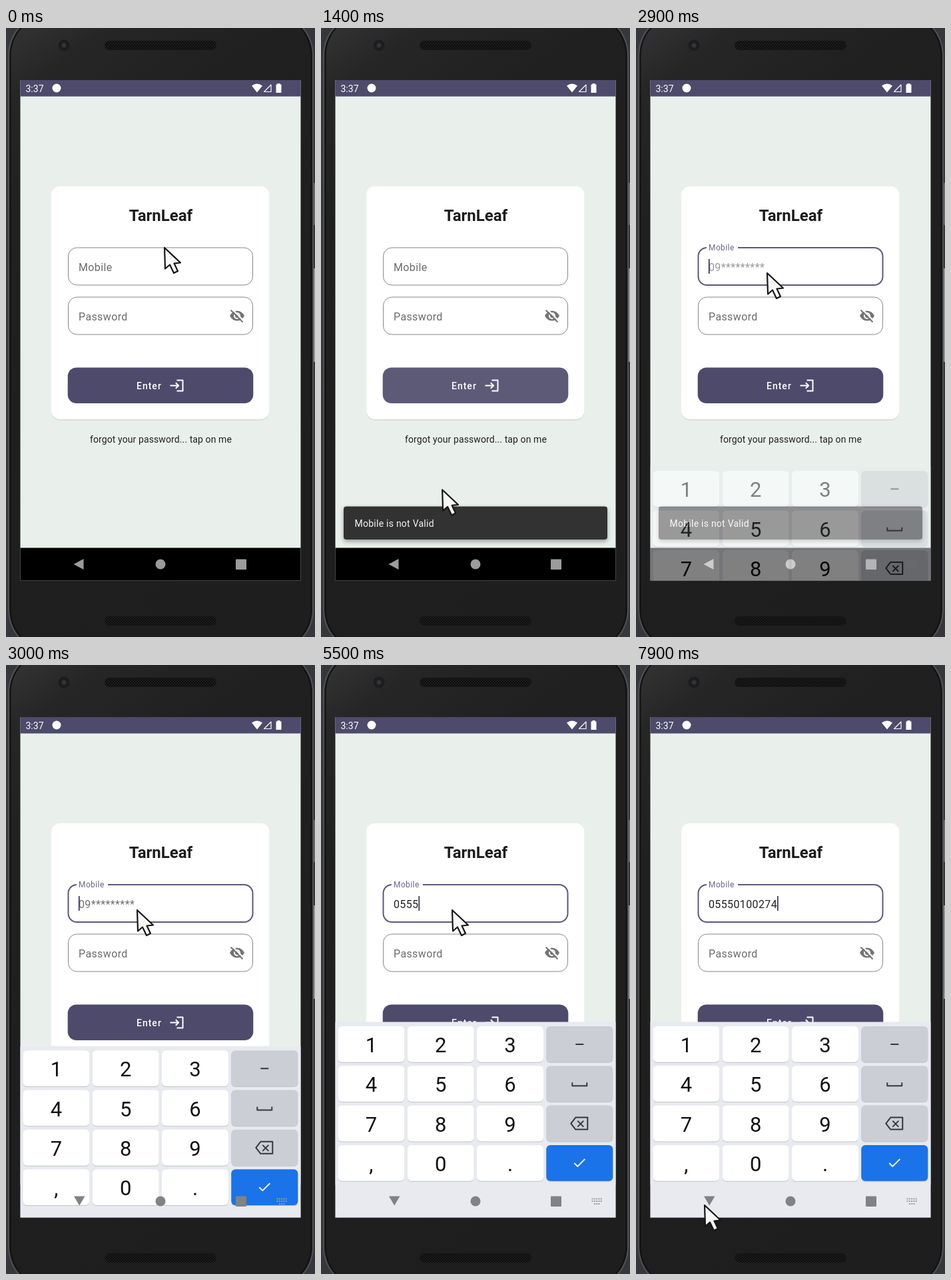
Animation, 464 px wide and 912 px high, one loop 8000 ms. Source, as an HTML page:

```html
<!DOCTYPE html>
<html lang="en">
<head>
<meta charset="utf-8">
<title>Login form</title>
<style>
  html, body { margin: 0; width: 100%; height: 100%; overflow: hidden; background: #36373b; }
  svg { display: block; width: 464px; height: 912px; }
  text { font-family: Roboto, sans-serif; white-space: pre; }
  .field { font-size: 16px; letter-spacing: .38px; }
  .small { font-size: 14px; }
  .digit { font-size: 31px; text-anchor: middle; fill: #111; }
  .line { fill: none; stroke-linejoin: round; }
</style>
</head>
<body>
<svg viewBox="0 0 464 912">
  <defs>
    <linearGradient id="body" x2=".35" y2="1">
      <stop offset="0" stop-color="#373737"/><stop offset=".12" stop-color="#262626"/>
      <stop offset=".3" stop-color="#202020"/><stop offset="1" stop-color="#1e1e1e"/>
    </linearGradient>
    <pattern id="mesh" width="4" height="4" patternUnits="userSpaceOnUse">
      <rect width="4" height="4" fill="#1c1c1c"/>
      <circle cx="1" cy="1" r=".9" fill="#070707"/><circle cx="3" cy="3" r=".9" fill="#070707"/>
    </pattern>
    <filter id="soft" x="-10%" y="-40%" width="120%" height="200%"><feGaussianBlur stdDeviation="3"/></filter>
    <clipPath id="screen"><rect x="21.500" y="78" width="421" height="749.500"/></clipPath>
    <clipPath id="btn"><rect x="92.700" y="508.500" width="278.600" height="53.500" rx="13"/></clipPath>
  </defs>

  <!-- phone -->
  <rect width="464" height="912" fill="#36373b"/>
  <rect x="461" y="232" width="3" height="63" fill="#68696b"/>
  <rect x="461" y="360" width="3" height="140" fill="#929395"/>
  <rect x="4" y="-24" width="457" height="960" rx="66" fill="url(#body)" stroke="#505154" stroke-width="2"/>
  <rect x="6.500" y="-21.500" width="452" height="955" rx="63.500" fill="none" stroke="#121212" stroke-width="2"/>
  <circle cx="87" cy="26" r="8.500" fill="#1d1d1f"/>
  <circle cx="87" cy="26" r="3.500" fill="#343438"/>
  <rect x="148" y="19" width="168" height="14" rx="7" fill="url(#mesh)"/>
  <rect x="148" y="881" width="168" height="14" rx="7" fill="url(#mesh)"/>

  <g clip-path="url(#screen)">
    <rect x="21" y="78" width="422" height="750" fill="#e9f0ec"/>
    <rect x="21" y="78" width="422" height="24.500" fill="#4d4a6b"/>
    <text class="small" x="29.500" y="96" fill="#fff">3:37</text>
    <circle cx="76" cy="90" r="6.500" fill="#fff"/>
    <path d="M369 86.500Q377 80.500 385 86.500L377 96.500Z" fill="#fff"/>
    <path class="line" d="M387.500 95.500H398V85Z" stroke="#fff" stroke-width="1.200"/>
    <path d="M405.500 84.500h2v-1.500h4v1.500h2v12.500h-8z" fill="#fff"/>

    <!-- card -->
    <rect x="68" y="238.500" width="327.500" height="349" rx="13" fill="#d2dad6"/>
    <rect x="68" y="237" width="327.500" height="349" rx="13" fill="#fff"/>
    <text x="232.500" y="289" text-anchor="middle" font-size="24" font-weight="700" fill="#1c1c1f">TarnLeaf</text>

    <rect id="box" class="line" x="93.500" y="329" width="277" height="56" rx="13"/>
    <rect id="gap" x="106" y="326" width="47" height="6" fill="#fff"/>
    <text id="label" x="109">Mobile</text>
    <text id="value" class="field" x="109" y="363.500"></text>
    <rect id="caret" y="346" width="2" height="22" fill="#4d4a6b"/>

    <rect class="line" x="93.500" y="403" width="277" height="56" rx="13" stroke="#868686"/>
    <text class="field" x="109" y="437.500" fill="#6b6b6d">Password</text>
    <g transform="translate(347 431)">
      <path d="M-11 0Q-7-7.500 0-7.500T11 0Q7 7.500 0 7.500T-11 0Z" fill="#747474"/>
      <circle r="4" fill="#747474" stroke="#fff" stroke-width="2"/>
      <path d="M-8-10.500L10.500 8" stroke="#fff" stroke-width="2"/>
      <path d="M-9.500-8.500L8.500 9.500" stroke="#747474" stroke-width="2"/>
    </g>

    <g clip-path="url(#btn)">
      <rect x="92" y="508" width="280" height="55" fill="#4d4a6b"/>
      <circle id="ripple" cx="236" cy="530" fill="#fff"/>
    </g>
    <text class="small" x="196" y="541" font-weight="500" letter-spacing="1" fill="#fff">Enter</text>
    <path class="line" transform="translate(244.500 523.500)" d="M2 12H14.500M10.300 7.700L14.600 12L10.300 16.300M12 4H21V20H12" stroke="#fff" stroke-width="2"/>
    <text class="small" x="126" y="621" letter-spacing=".1" fill="#222">forgot your password... tap on me</text>

    <!-- system navigation -->
    <g fill="#9b9b9b">
      <rect x="21" y="778.500" width="422" height="50" fill="#000"/>
      <path d="M101.500 803L116.500 795V811Z"/><circle cx="232" cy="803" r="7.500"/>
      <rect x="345" y="795.500" width="16" height="15.500" rx="1"/>
    </g>

    <g id="snack">
      <rect x="34" y="719" width="396" height="50" rx="4" fill="#000" opacity=".35" filter="url(#soft)"/>
      <rect x="34" y="716.500" width="396" height="49.500" rx="4" fill="#323232"/>
      <text class="small" x="50.500" y="747" letter-spacing=".25" fill="#f2f2f2">Mobile is not Valid</text>
    </g>

    <g id="board">
      <g id="keys"><rect x="21" y="534.500" width="422" height="295" fill="#e8eaf0"/></g>
      <g id="nav" fill="#818186">
        <path d="M102 795.500H118.500L110.200 809.500Z"/><circle cx="232" cy="803" r="7.500"/>
        <rect x="345" y="795.500" width="16" height="15.500" rx="1"/>
      </g>
      <path id="mini" d="M406.500 799.500H423M406.500 803H423M410 807H419.500" fill="none" stroke-width="1.800" stroke-dasharray="2 1.300"/>
    </g>
  </g>

  <path id="mouse" d="M0 1L1 32.500L8 26.500L14 39L20 36L14.500 24.500L24 23.500Z" fill="#f8f8f8" stroke="#161616" stroke-width="2.200" stroke-linejoin="round"/>
</svg>
<script>
const LOOP = 8000, STEP = 100, BLINK = 400, CLICK = 1000, FOCUS = 2900;
const $ = id => document.getElementById(id);
const set = (id, attrs) => {
  for (const k in attrs) $(id).setAttribute(k, attrs[k]);
};
const make = (name, attrs, text = '') => {
  const el = document.createElementNS('http://www.w3.org/2000/svg', name);
  for (const k in attrs) el.setAttribute(k, attrs[k]);
  el.textContent = text;
  $('keys').append(el);
};
const ramp = (t, from, to) => Math.min(1, Math.max(0, (t - from) / (to - from)));
const smooth = p => p * p * (3 - 2 * p);

// Keypad
const icons = {
  ' ': 'M-11-2V3H11V-2',
  '<': 'M-13 0L-6-9H12V9H-6ZM-3-4L6 5M6-4L-3 5',
  '+': 'M-8 0L-3 5L8-6',
  '–': 'M-6 0H6'
};
['123–', '456 ', '789<', ',0.+'].forEach((row, r) => [...row].forEach((ch, c) => {
  const x = 25.4 + c * 104.3, y = 541 + r * 59.3, enter = ch === '+';
  const key = { x, y, width: 100, height: 53.8, rx: 6 };
  make('rect', { ...key, y: y + 1, fill: '#bfc2c8' });
  make('rect', { ...key, fill: c < 3 ? '#fff' : enter ? '#1a73e8' : '#cbced4' });
  if (icons[ch]) make('path', {
    d: icons[ch], class: 'line', stroke: enter ? '#fff' : '#35383b', 'stroke-width': 2,
    transform: `translate(${x + 50} ${y + 27})`
  });
  else make('text', { class: 'digit', x: x + 50, y: y + 39 }, ch);
}));

// Pointer moves: each bends towards a control point on its way
const moves = [
  { from: 0, to: 800, bend: [266, 430], end: [236, 528] },
  { from: 1100, to: 1800, bend: [178, 794], end: [67, 757] },
  { from: 1800, to: 2000, bend: [150, 757], end: [237, 757] },
  { from: 2100, to: 2600, bend: [108, 560], end: [197, 366] },
  { from: 7400, to: 7900, bend: [330, 1000], end: [103, 808] }
];
function pointer(t) {
  let pos = [238, 328];
  for (const { from, to, bend, end } of moves) {
    const p = smooth(ramp(t, from, to)), q = 1 - p;
    pos = pos.map((v, i) => q * q * v + 2 * p * q * bend[i] + p * p * end[i]);
  }
  return pos;
}

// Bursts of keys, one per step; a negative count deletes
const number = '05550100274';
const bursts = [[4000, 2], [4400, 3], [5500, -1], [6300, 1], [6500, 4], [7000, 2]];
function typing(t) {
  let length = 0, last = FOCUS - STEP;
  for (const [at, count] of bursts) {
    for (let i = 0; i < Math.abs(count); i++) {
      if (t < at + i * STEP) continue;
      length += Math.sign(count);
      last = at + i * STEP;
    }
  }
  return { text: number.slice(0, length), caret: Math.floor((t - last) / BLINK) % 2 === 0 };
}

function draw(t) {
  set('mouse', { transform: `translate(${pointer(t)})` });
  set('ripple', {
    r: t < CLICK ? 0 : 50 + (t - CLICK) * .6,
    opacity: .09 * ramp(t, 900, 1100) * (1 - ramp(t, 1400, 1700))
  });

  const snack = smooth(ramp(t, CLICK, 1300));
  set('snack', {
    opacity: t < 3200 ? snack : 0,
    transform: `translate(232 741) scale(${.85 + .15 * snack}) translate(-232 -741)`
  });

  const focused = t >= FOCUS, { text, caret } = typing(t);
  set('box', { stroke: focused ? '#5b587b' : '#868686', 'stroke-width': focused ? 2 : 1 });
  set('gap', { opacity: +focused });
  set('label', {
    y: focused ? 333 : 363.5, fill: focused ? '#67648a' : '#6b6b6d',
    'font-size': focused ? 12 : 16, 'letter-spacing': focused ? .4 : .38
  });
  $('value').textContent = focused ? text || '09*********' : '';
  set('value', { fill: text ? '#222' : t < 3000 ? '#989898' : '#6f6f6f' });
  set('caret', { x: 108.8 + 9.37 * text.length, opacity: +(focused && caret) });

  const rise = ramp(t, 2800, 3200);
  set('board', { opacity: Math.min(1, 2 * rise) });
  set('keys', { transform: `translate(0 ${290 * (1 - rise) ** 3})` });
  set('nav', { opacity: +(t >= 3000) });
  set('mini', { stroke: t < 3000 ? '#d8d8d8' : '#9a9a9f' });
}

const start = performance.now();
function tick() {
  const t = (performance.now() - start) % LOOP;
  draw(Math.floor(t / STEP) * STEP);
  requestAnimationFrame(tick);
}
tick();
</script>
</body>
</html>
```
